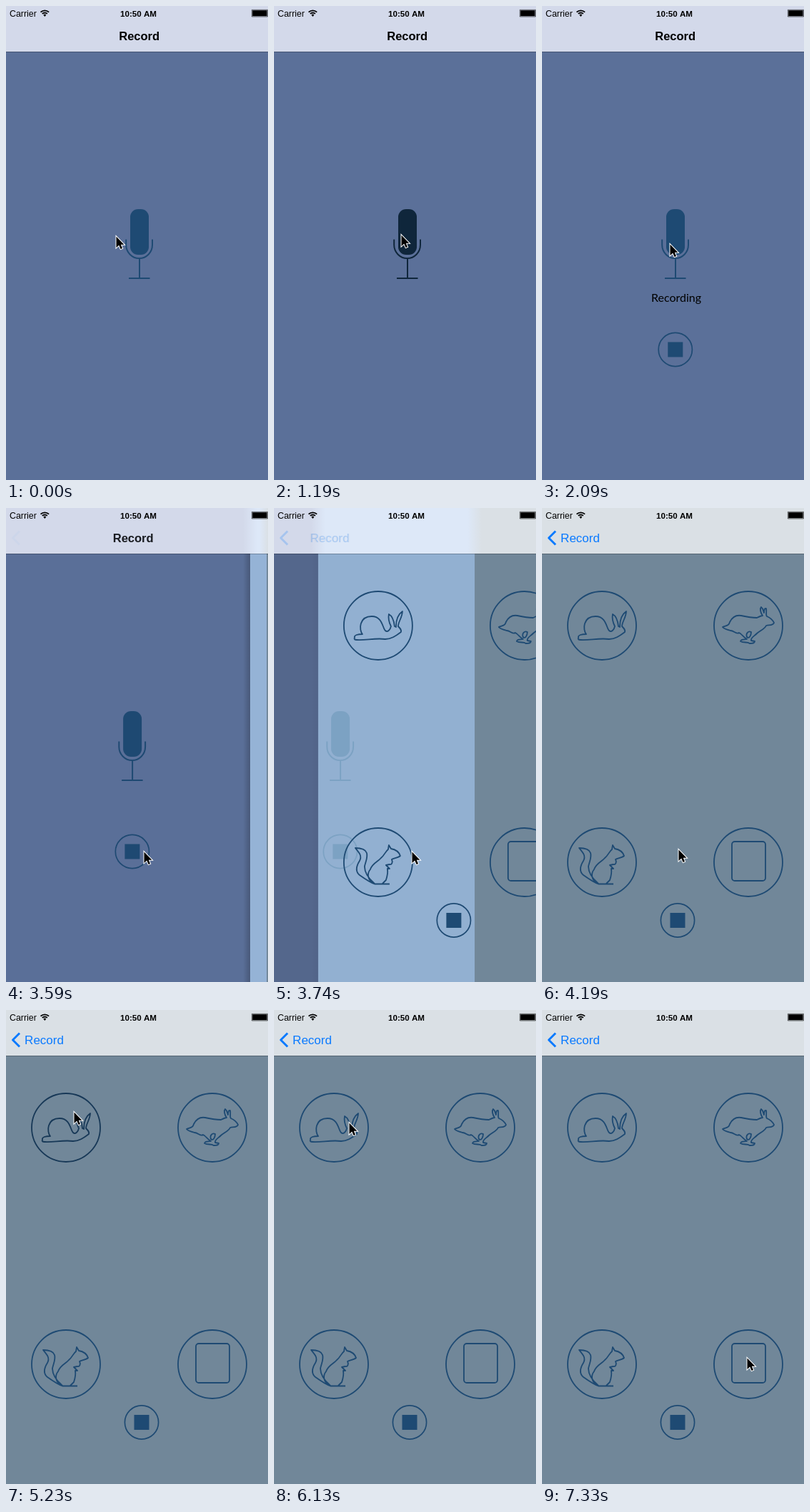
These frames come from a looping animation (367 by 665 pixels, 8 s). An HTML page with a canvas:

```html
<!DOCTYPE html>
<html lang="en">
<head>
<meta charset="utf-8">
<title>Record</title>
<style>
html, body { margin: 0; width: 100%; height: 100%; overflow: hidden; }
canvas { display: block; width: 367px; height: 665px; }
</style>
</head>
<body>
<canvas></canvas>
<script>
const W = 367, H = 665, SCREEN = 375, LOOP = 8000;
const INK = '#1e4a73', PRESSED = '#0f263b', BLUE = '#0a7aff';
const BAR_OUT = '#d3d9ea', BAR_MIX = '#dde8f8', BAR_IN = '#dae0e5';
const SANS = '"Liberation Sans", Arial, sans-serif';

const canvas = document.querySelector('canvas');
const dpr = window.devicePixelRatio || 1;
canvas.width = W * dpr;
canvas.height = H * dpr;
const c = canvas.getContext('2d');

// Stepped tracks: [start ms, value...]
const CURSOR = [
  [0, 154, 323], [450, 178, 321],
  [2090, 179, 334], [2240, 183, 372], [2390, 188, 425], [2540, 192, 468], [2690, 193, 482],
  [4190, 191, 479], [4330, 190, 476],
  [4630, 152, 310], [4780, 99, 138], [4930, 95, 143],
  [6130, 105, 158], [6280, 136, 196], [6430, 178, 254], [6580, 220, 322],
  [6730, 255, 380], [6880, 278, 416], [7030, 287, 433], [7180, 288, 465], [7330, 287, 488]
];
const PUSH = [[0, 0], [3590, .088], [3740, .835], [3890, .977], [4040, .997], [4190, 1]];

const ICONS = {
  snail: new Path2D('M51 182C50 178 56 177 62 177C57 171 57 152 75 152C90 152 90 168 94 172C97 175 101 171 102 166C99 160 98 154 99 149C103 151 106 157 107 166L109 167C109 158 112 149 118 145C118 153 112 160 112 166C115 169 117 171 116 174C108 180 102 184 94 184C80 182 66 186 54 185C51 185 50 184 51 182Z'),
  rabbit: new Path2D('M253 167C258 165 262 165 263 160C267 152 273 150 279 151C288 153 295 154 301 154C305 152 307 151 309 151C306 147 305 141 307 139C310 141 310 145 311 147C311 143 312 140 314 141C315 146 313 150 315 152C320 154 323 157 325 161C324 165 318 164 314 165C312 170 305 172 301 176C297 180 292 182 293 186L298 187C298 190 295 190 291 190C287 187 283 190 278 187C279 183 284 185 287 184C283 182 279 176 276 175C273 178 269 172 264 172C259 170 255 170 253 167ZM287 181C285 176 289 172 293 174C293 179 290 184 287 181Z'),
  squirrel: new Path2D('M79 527C72 521 65 512 65 503C66 497 70 490 68 484C66 478 58 477 52 477C57 483 62 488 58 495C53 503 52 510 58 515C65 520 72 525 79 527.5H100M79 527C69 523 68 513 73 507C76 498 84 496 88 491C93 487 94 482 98 479L99 473L102 478C108 479 113 482 115 488C112 491 106 491 103 493C105 497 103 501 100 500L95 501L100 506L97 506C98 512 96 519 95 522L90 527')
};
ICONS.mask = new Path2D();
ICONS.mask.roundRect(266, 468, 47, 55, 4);
const ARROW = new Path2D('M.5.5V16L4.2 12.6L6.6 18L9 17L6.8 11.7H11.4Z');

const now = (track, t) => track.filter(k => k[0] <= t).pop().slice(1);
const during = (t, a, b) => t >= a && t < b;

function rect(x, y, w, h, fill) {
  c.fillStyle = fill;
  c.fillRect(x, y, w, h);
}

function ring(x, y, r) {
  c.beginPath();
  c.arc(x, y, r, 0, Math.PI * 2);
  c.stroke();
}

function pen(color, width) {
  c.strokeStyle = c.fillStyle = color;
  c.lineWidth = width;
}

function text(s, x, y, font, color = '#000', align = 'center', alpha = 1) {
  c.globalAlpha = alpha;
  c.font = font;
  c.textAlign = align;
  c.fillStyle = color;
  c.fillText(s, x, y);
  c.globalAlpha = 1;
}

function mic(color) {
  pen(color, 2);
  c.beginPath();
  c.roundRect(174, 285, 26, 64, 11);
  c.fill();
  c.stroke(new Path2D('M168.2 327.5V335A18.4 19 0 0 0 205 335V327.5M187 354V382M172 382H201.5'));
}

function stop(x, y, color) {
  pen(color, 1.7);
  ring(x, y, 23.6);
  c.fillRect(x - 10.5, y - 10.5, 21, 21);
}

function badge(x, y, icon, color) {
  pen(color, 1.8);
  ring(x, y, 48);
  c.stroke(ICONS[icon]);
}

function recordScreen(t, p) {
  c.save();
  c.translate(-.3 * SCREEN * p, 0);
  rect(0, 0, SCREEN, H, '#5b7099');
  mic(during(t, 1190, 1340) ? PRESSED : INK);
  if (t >= 1340) stop(186.8, 482, during(t, 3290, 3590) ? PRESSED : INK);
  if (during(t, 1340, 3590)) text('Recording', 188, 415, '16px Lato, sans-serif');
  rect(0, 0, SCREEN, H, `rgba(0,0,0,${.1 * p})`);
  c.restore();
}

function effectsScreen(t, p) {
  const x = SCREEN * (1 - p);
  if (p < 1) {
    const shade = c.createLinearGradient(x - 10, 0, x, 0);
    shade.addColorStop(0, 'rgba(0,0,0,0)');
    shade.addColorStop(1, `rgba(0,0,0,${.22 * (1 - p)})`);
    rect(x - 10, 0, 10, H, shade);
  }
  c.save();
  c.translate(x, 0);
  rect(0, 0, SCREEN, H, 'rgba(188,225,255,.6)');
  const snail = during(t, 5380, 5530) ? PRESSED : during(t, 5230, 5680) ? '#173857' : INK;
  badge(84, 165, 'snail', snail);
  badge(289, 165, 'rabbit', INK);
  badge(84, 497, 'squirrel', INK);
  badge(289, 497, 'mask', INK);
  stop(190, 578.5, INK);
  c.restore();
}

function barFill(p) {
  if (p === 0) return BAR_OUT;
  if (p === 1) return BAR_IN;
  const g = c.createLinearGradient(0, 0, W, 0);
  const add = (x, color) => g.addColorStop(Math.min(1, Math.max(0, x / W)), color);
  const left = SCREEN * (1 - p), right = SCREEN * (1 - .3 * p);
  add(left - 10, BAR_OUT);
  add(left + 10, BAR_MIX);
  add(right - 10, BAR_MIX);
  add(right + 10, BAR_IN);
  return g;
}

function statusBar() {
  text('Carrier', 5, 15, `12.4px ${SANS}`, '#000', 'left');
  text('10:50 AM', 185.5, 15, `bold 11.6px ${SANS}`);
  pen('#000', 1.8);
  for (const r of [5, 8.2]) {
    c.beginPath();
    c.arc(54.3, 14.5, r, -Math.PI * .75, -Math.PI * .25);
    c.stroke();
  }
  c.beginPath();
  c.moveTo(54.3, 15);
  c.arc(54.3, 14.5, 2.8, -Math.PI * .75, -Math.PI * .25);
  c.fill();
  pen('#000', .6);
  c.strokeRect(344.4, 5.4, 22, 9.6);
  rect(345.2, 6.2, 20.4, 8, '#000');
}

function navBar(p) {
  rect(0, 0, W, 64, barFill(p));
  rect(0, 64, W, 1, 'rgba(0,0,0,.25)');
  const q = p ** 1.13, mid = 186.7 - 133.2 * q;
  if (p < 1) text('Record', mid, 48, `bold 16.5px ${SANS}`, '#000', 'center', (1 - q) ** 2);
  if (p > 0) {
    const alpha = .03 + .97 * q ** 8;
    text('Record', mid, 48, `17px ${SANS}`, BLUE, 'center', alpha);
    c.globalAlpha = alpha;
    pen(BLUE, 3);
    c.stroke(new Path2D('M19 32.5L9.5 42L19 51.5'));
    c.globalAlpha = 1;
  }
  statusBar();
}

function cursor([x, y]) {
  c.save();
  c.translate(x, y);
  c.lineJoin = 'miter';
  pen('#fff', 2);
  c.stroke(ARROW);
  c.fillStyle = '#000';
  c.fill(ARROW);
  c.restore();
}

function draw() {
  const t = performance.now() % LOOP;
  const [p] = now(PUSH, t);
  c.setTransform(dpr, 0, 0, dpr, 0, 0);
  c.lineJoin = 'round';
  rect(0, 0, W, H, '#000');
  if (p < 1) recordScreen(t, p);
  if (p > 0) effectsScreen(t, p);
  navBar(p);
  cursor(now(CURSOR, t));
  requestAnimationFrame(draw);
}
draw();
</script>
</body>
</html>
```
